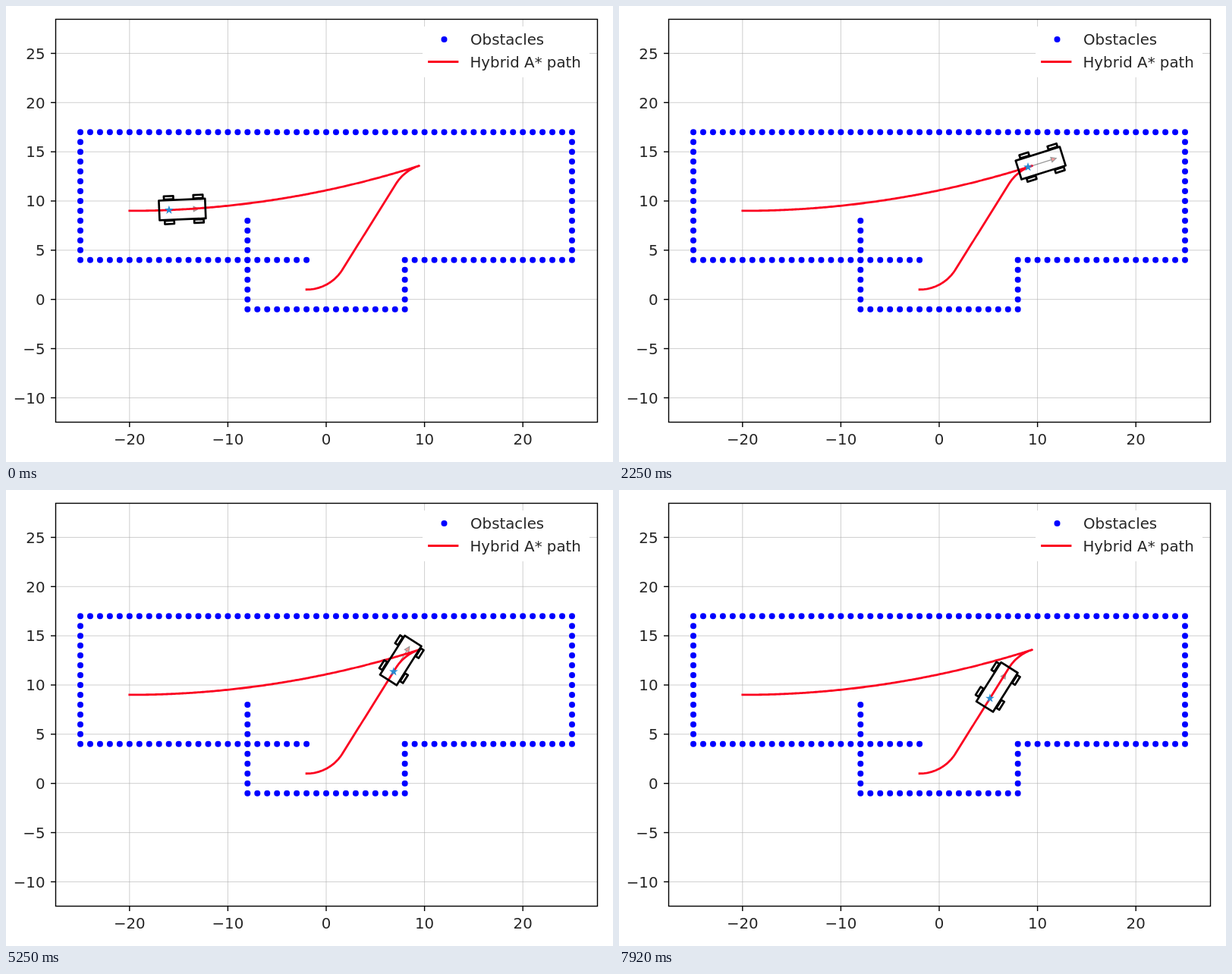
These frames come from a looping animation (800x601 px, 8000 ms). An HTML page:

```html
<!DOCTYPE html>
<html lang="en">
<head>
<meta charset="utf-8">
<title>Hybrid A* path</title>
<style>
  html, body { margin: 0; width: 100%; height: 100%; overflow: hidden; background: #fff; }
  svg { display: block; width: 800px; height: 601px; }
  text { font: 19.8px "DejaVu Sans", sans-serif; fill: #262626; }
</style>
</head>
<body>
<svg id="plot" viewBox="0 0 800 601"></svg>
<script>
const SCALE = 12.96;
const X = x => 422 + SCALE * x;
const Y = y => 386.7 + -12.97 * y;
const RED = '#fb0220', BLUE = '#0000ff';

const svg = document.getElementById('plot');
function add(tag, attrs, parent = svg, text) {
  const el = document.createElementNS('http://www.w3.org/2000/svg', tag);
  for (const key in attrs) el.setAttribute(key, attrs[key]);
  if (text) el.textContent = text;
  parent.appendChild(el);
  return el;
}
const label = (x, y, text, anchor = 'start') =>
  add('text', { x, y, 'text-anchor': anchor }, svg, text);
const num = v => String(v).replace('-', '\u2212');

// Axes: grid, ticks and labels
const LEFT = 65.5, RIGHT = 779.5, TOP = 17.5, BOTTOM = 548.5;
const grid = { stroke: '#b0b0b0', 'stroke-width': 1, 'stroke-opacity': .6 };
const tick = { stroke: '#000', 'stroke-width': 1.4 };
for (let v = -20; v <= 20; v += 10) {
  const x = X(v);
  add('path', { d: `M${x} ${TOP}V${BOTTOM}`, ...grid });
  add('path', { d: `M${x} ${BOTTOM}v6.5`, ...tick });
  label(x, 578, num(v), 'middle');
}
for (let v = -10; v <= 25; v += 5) {
  const y = Y(v);
  add('path', { d: `M${LEFT} ${y}H${RIGHT}`, ...grid });
  add('path', { d: `M${LEFT} ${y}h-6.5`, ...tick });
  label(51.5, y + 7.3, num(v), 'end');
}

// Vehicle pose along the planned path, s = distance travelled
const R1 = 97, R2 = 4.3;
const cuspAngle = Math.asin(29.45 / R1), steep = 57.7 * Math.PI / 180;
const FORWARD = R1 * cuspAngle;
const ARC_IN = R2 * (steep - cuspAngle), ARC_OUT = R2 * steep;
const goal = { x: -2, y: 1 };

function advance(p, radius, angle) {
  return {
    x: p.x + radius * (Math.sin(angle) - Math.sin(p.a)),
    y: p.y + radius * (Math.cos(p.a) - Math.cos(angle)),
    a: angle
  };
}
const start = { x: -20, y: 9, a: 0 };
const cusp = advance(start, R1, cuspAngle);
const turned = advance(cusp, -R2, steep);
const last = { x: goal.x + R2 * Math.sin(steep), y: goal.y + R2 * (1 - Math.cos(steep)) };
const STRAIGHT = Math.hypot(turned.x - last.x, turned.y - last.y);

function pose(s) {
  if (s <= FORWARD) return advance(start, R1, s / R1);
  s -= FORWARD;
  if (s <= ARC_IN) return advance(cusp, -R2, cuspAngle + s / R2);
  s -= ARC_IN;
  if (s <= STRAIGHT) {
    const k = s / STRAIGHT;
    return {
      x: turned.x + (last.x - turned.x) * k,
      y: turned.y + (last.y - turned.y) * k,
      a: steep
    };
  }
  const a = steep - (s - STRAIGHT) / R2;
  return { x: goal.x + R2 * Math.sin(a), y: goal.y + R2 * (1 - Math.cos(a)), a };
}

// Heading arrow lies under the path, car body above it
const arrow = add('g', { stroke: '#000', 'stroke-width': 1.3, opacity: .4 });
add('path', { d: `M0 0H${2.5 * SCALE}`, fill: 'none' }, arrow);
add('path', { d: `M${2.5 * SCALE} -3.2L${3 * SCALE} 0L${2.5 * SCALE} 3.2Z`, fill: '#f00' }, arrow);

const obstacles = add('g', { fill: BLUE });
function dots(x, y, dx, dy, count) {
  for (let i = 0; i < count; i++)
    add('circle', { cx: X(x + dx * i), cy: Y(y + dy * i), r: 4 }, obstacles);
}
dots(-25, 17, 1, 0, 51);
dots(-25, 4, 0, 1, 13);
dots(25, 4, 0, 1, 13);
dots(-24, 4, 1, 0, 23);
dots(8, 4, 1, 0, 17);
dots(-8, -1, 0, 1, 10);
dots(8, 0, 0, 1, 4);
dots(-7, -1, 1, 0, 16);

const total = FORWARD + ARC_IN + STRAIGHT + ARC_OUT;
const distances = [FORWARD];
for (let i = 0; i <= 300; i++) distances.push(total * i / 300);
distances.sort((a, b) => a - b);
const points = distances.map(pose).map(p => `${X(p.x).toFixed(2)},${Y(p.y).toFixed(2)}`);
const line = {
  fill: 'none', stroke: RED, 'stroke-width': 2.8,
  'stroke-linejoin': 'round', 'stroke-linecap': 'square'
};
add('polyline', { points: points.join(' '), ...line });

const car = add('g', { fill: 'none', stroke: '#000', 'stroke-width': 2.7, 'stroke-linejoin': 'round' });
function box(x, y, w, h) {
  add('rect', { x: x * SCALE, y: y * SCALE, width: w * SCALE, height: h * SCALE }, car);
}
box(-1, -1, 4.7, 2);
for (const axle of [0, 3])
  for (const side of [-1.25, 1.25]) box(axle - .48, side - .17, .96, .34);

const star = [];
for (let i = 0; i < 10; i++) {
  const r = i % 2 ? 2.4 : 6.2, a = i * Math.PI / 5;
  star.push(`${r * Math.sin(a)},${-r * Math.cos(a)}`);
}
const marker = add('polygon', { points: star.join(' '), fill: '#268bd2' });

// Frame and legend
add('rect', {
  x: LEFT, y: TOP, width: RIGHT - LEFT, height: BOTTOM - TOP,
  fill: 'none', stroke: '#000', 'stroke-width': 1.4
});
add('rect', { x: 549, y: 27, width: 220, height: 67, rx: 3, fill: '#fff' });
add('circle', { cx: 577.5, cy: 44, r: 4, fill: BLUE });
add('path', { d: 'M557.5 73.5H595', ...line });
label(612, 50.5, 'Obstacles');
label(611.5, 80.5, 'Hybrid A* path');

// 96 discrete steps per loop: fast forward drive, then slow reversing
const LOOP = 8000, STEPS = 96, CUSP_STEP = 28;
function draw(time) {
  const n = Math.floor((time % LOOP + 4) * STEPS / LOOP) % STEPS;
  const s = n < CUSP_STEP
    ? Math.min(FORWARD, 4.02 + .943 * n)
    : FORWARD + .1 * (n - CUSP_STEP);
  const p = pose(s);
  const move = `translate(${X(p.x)} ${Y(p.y)})`;
  const turn = `${move} rotate(${-p.a * 180 / Math.PI})`;
  arrow.setAttribute('transform', turn);
  car.setAttribute('transform', turn);
  marker.setAttribute('transform', move);
}

const began = performance.now();
function tickFrame() {
  draw(performance.now() - began);
  requestAnimationFrame(tickFrame);
}
tickFrame();
</script>
</body>
</html>
```
